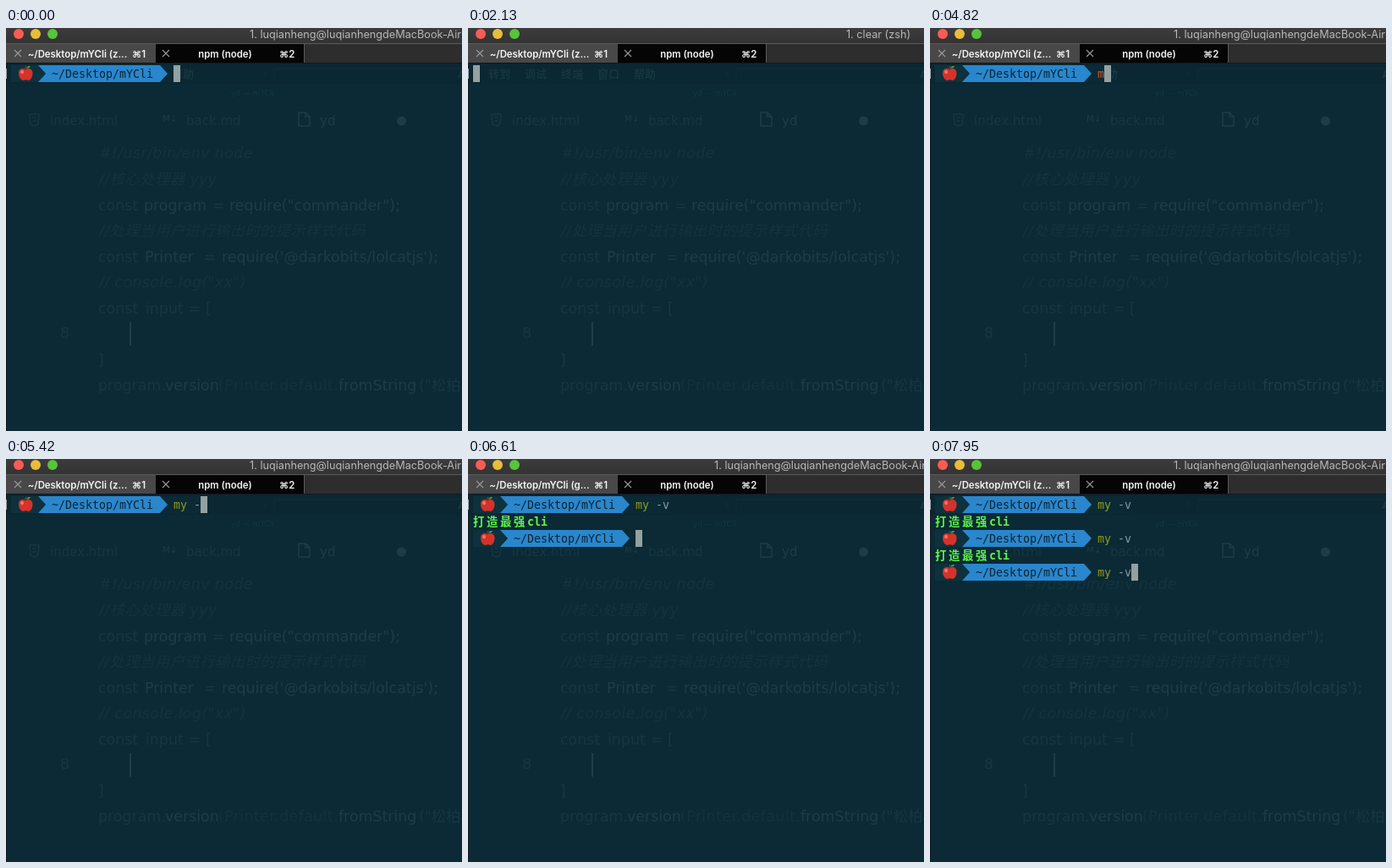
Animation, 539 px wide and 477 px high, one loop 8000 ms. Source, as an HTML page:

```html
<!DOCTYPE html>
<html lang="en">
<head>
<meta charset="utf-8">
<title>Terminal session</title>
<style>
  html, body { margin: 0; width: 100%; height: 100%; overflow: hidden; background: #0b2a35; }
  svg { display: block; width: 100vw; height: 100vh; }
  text { white-space: pre; }
  .ui { font-family: Inter, "DejaVu Sans", sans-serif; }
  .title { font-size: 12.7px; fill: #b8b8b8; }
  .tab { font-size: 11.4px; font-weight: 600; fill: #f4f4f4; }
  .mono { font: 13.29px "DejaVu Sans Mono", monospace; }
  .out { font: bold 13.29px "DejaVu Sans Mono", "Noto Sans CJK SC", "Noto Sans CJK", monospace; fill: #60f54b; }
  .ghost { font: 17.4px "DejaVu Sans", "Noto Sans CJK SC", "Noto Sans CJK", sans-serif; fill: #163640; }
  .faint { fill: #14333d; font-style: italic; letter-spacing: .4px; }
  .dim { fill: #13323c; letter-spacing: .4px; }
  .strong { fill: #1c3d48; }
  .file { font-size: 15px; }
  .menu { font-size: 13px; font-weight: bold; fill: #17363f; }
  .line { fill: none; stroke: #163640; stroke-width: 1.5; }
</style>
</head>
<body>
<svg viewBox="0 0 539 477" preserveAspectRatio="none">
  <defs>
    <linearGradient id="bar" x2="0" y2="1">
      <stop offset="0" stop-color="#3d3c3c"/>
      <stop offset="1" stop-color="#343333"/>
    </linearGradient>
    <g id="prompt">
      <path d="M6 0H38L46 10 38 20H6Z" fill="#0d323e"/>
      <path d="M38 0H182L191 10 182 20H38L47 10Z" fill="#2a86cd"/>
      <path d="M23 5C20 3 15 4 15 9.500C15 14 18 18 20.500 18C22 18 22.500 17.300 23.500 17.300S25 18 26.500 18C29 18 31.500 14 31.500 9.500C31.500 4 26 3 23 5Z" fill="#d6322b"/>
      <ellipse cx="19" cy="8" rx="2" ry="2.300" fill="#f0776a"/>
      <path d="M23 6Q22.500 3 24 1" fill="none" stroke="#6b4426" stroke-width="1.300"/>
      <path d="M24 3.500Q25 .5 29 1Q28 4 24 3.500Z" fill="#62a63a"/>
      <text class="mono" x="54" y="14.500" fill="#0a2530">~/Desktop/mYCli</text>
    </g>
    <path id="close" d="M-4 -4L4 4M4 -4L-4 4" stroke="#999" stroke-width="1.100"/>
  </defs>

  <rect width="539" height="477" fill="#0b2a35"/>
  <rect y="42" width="539" height="24" fill="#0b2731"/>
  <g id="ghost"></g>
  <path d="M.5 41V477" stroke="#12191d"/>
  <path d="M.5 48V60" stroke="#9aa3a6"/>

  <rect width="539" height="18" fill="url(#bar)"/>
  <rect y="18" width="539" height="24" fill="#2d2d2d"/>
  <rect y="19" width="177" height="22" fill="#484848"/>
  <rect x="177" y="19" width="175" height="22" fill="#050505"/>
  <path d="M0 41.500H539" stroke="#171717"/>
  <path d="M0 18.500H539M352.500 18V41" stroke="#5a5a5a"/>
  <circle cx="15" cy="7" r="6" fill="#fb5b55"/>
  <circle cx="35" cy="7" r="6" fill="#e8bd3b"/>
  <circle cx="55" cy="7" r="6" fill="#57c43c"/>
  <use href="#close" x="14" y="30"/>
  <use href="#close" x="189" y="30"/>
  <g class="ui tab">
    <text id="tab" x="84.500" y="34.500" text-anchor="middle"></text>
    <text x="149" y="34.500">⌘1</text>
    <text x="259" y="34.500" text-anchor="middle">npm (node)</text>
    <text x="323" y="34.500">⌘2</text>
  </g>
  <text id="title" class="ui title" y="12"></text>
  <g id="screen"></g>
</svg>
<script>
const $ = id => document.getElementById(id);
const LOOP = 8000, ROW = 20, CELL = 8, LEFT = 6, TOP = 44, PROMPT = 24;

const esc = s => s.replace(/&/g, '&amp;').replace(/</g, '&lt;');
const rect = (x, y, w, fill) => `<rect x="${x}" y="${y}" width="${w}" height="${ROW}" fill="${fill}"/>`;

// Editor window showing faintly through the terminal
const code = (x, y, s, cls = '') => `<text x="${x}" y="${y}" class="ghost ${cls}">${esc(s)}</text>`;
$('ghost').innerHTML = [
  ...['转到', '调试', '终端', '窗口', '帮助'].map((s, i) => code(24 + i * 43, 59, s, 'menu')),
  '<path class="line" d="M304 51l3 3-3 3M317 64V48H539" opacity=".4"/>',
  code(534, 59, 'A', 'menu'),
  '<text class="ghost" x="266" y="80" style="font-size:9px">yd — mYCli</text>',
  '<path class="line" d="M28 102H39L38 114 33.500 116 29 114ZM31 106H36M31 110H36"/>',
  code(52, 115, 'index.html', 'file'),
  '<text class="ghost strong" x="185" y="111" style="font-size:10px">M↓</text>',
  code(213, 115, 'back.md', 'file'),
  '<path class="line" d="M346 100H354L359 105V116H346ZM354 100V105H359" style="stroke:#1c3d48"/>',
  code(371, 115, 'yd', 'file strong'),
  '<circle cx="467.500" cy="110" r="5.500" fill="#1c3d48"/>',
  code(110, 154, '#!/usr/bin/env node', 'faint'),
  code(110, 185, '//核心处理器 yyy', 'faint'),
  code(109, 216, 'const'), code(163, 216, 'program', 'strong'), code(244, 216, '='),
  code(264, 216, 'require("commander");', 'strong'),
  code(110, 246, '//处理当用户进行输出时的提示样式代码', 'faint'),
  code(109, 277, 'const'), code(164, 277, 'Printer', 'strong'), code(234, 277, '='),
  code(255, 277, "require('@darkobits/lolcatjs');", 'strong'),
  code(110, 307, '// console.log("xx")', 'faint'),
  code(109, 338, 'const'), code(165, 338, 'input'), code(216, 338, '='), code(236, 338, '['),
  code(64, 367, '8'),
  '<path class="line" d="M147 348V376" style="stroke:#274650"/>',
  code(109, 399, ']'),
  code(109, 429, 'program.'), code(188, 429, 'version', 'strong'),
  code(251, 429, '(Printer.default.', 'dim'),
  code(393, 429, 'fromString', 'strong'), code(488, 429, '("松柏小筑")')
].join('');

const OUT = '打造最强cli';
const HOST = '1. luqianheng@luqianhengdeMacBook-Air: ~/Desktop/mYCli ';
const home = job => ({ title: HOST + `(${job})`, x: job === 'git' ? 291 : 288 });
const running = s => ({ title: '1. ' + s, x: null });
const cwd = c => ({ tab: `~/Desktop/mYCli (${c}...` });
const rows = (...list) => ({ rows: list });
const run = '$my -v';

// Each step changes only what it names; "$" marks a prompt row
const steps = [
  [0, home('zsh'), cwd('z'), rows('$')],
  [500, rows('$clear')],
  [940, running('clear (zsh)')],
  [1090, home('zsh'), rows('$')],
  [1840, rows('$clear')],
  [2130, running('clear (zsh)'), rows('')],
  [2280, home('zsh'), cwd('g'), rows('$')],
  [2430, home('git')],
  [3030, home('zsh'), cwd('z')],
  [4820, rows('$m')],
  [4970, rows('$my')],
  [5270, rows('$my ')],
  [5420, rows('$my -')],
  [5720, rows(run)],
  [6160, running('my -v (zsh)'), { tab: 'my (zsh)' }, rows(run, '')],
  [6460, home('zsh'), cwd('z'), rows(run, OUT, '$')],
  [6610, home('git'), cwd('g')],
  [7060, rows(run, OUT, run)],
  [7210, running('my -v (git)'), { tab: 'my (git)' }],
  [7360, running('my -v (zsh)'), { tab: 'my (zsh)' }, rows(run, OUT, run, '')],
  [7500, home('zsh'), cwd('z')],
  [7650, rows(run, OUT, run, OUT, '$')],
  [7950, rows(run, OUT, run, OUT, run)]
];
let last = {};
const states = steps.map(([at, ...changes]) => last = Object.assign({}, last, ...changes, { at }));

function command(s, y) {
  const [name] = s.split(' ');
  const x = LEFT + PROMPT * CELL;
  const known = name === 'my' || name === 'clear';
  return `<text class="mono" x="${x}" y="${y}" fill="#8a9aa0"><tspan fill="${known ? '#919c1c' : '#d4542a'}">${name}</tspan>${s.slice(name.length)}</text>`;
}

function output(s, y) {
  let x = LEFT;
  const xs = [...s].map(c => {
    const at = x;
    x += c > '\u2e80' ? 2 * CELL : CELL;
    return at;
  });
  return rect(LEFT, y, x - LEFT, '#0b2a35') +
    `<text class="out" x="${xs.join(' ')}" y="${y + 14.5}">${s}</text>`;
}

function row(s, i) {
  const y = TOP + i * ROW;
  if (!s) return '';
  if (s[0] !== '$') return output(s, y);
  const cmd = s.slice(1);
  return rect(LEFT, y, (PROMPT + cmd.length) * CELL, '#0b2a35') +
    `<use href="#prompt" y="${y}"/>` + command(cmd, y + 14.5);
}

function cursor(list) {
  const end = list[list.length - 1];
  const col = end[0] === '$' ? PROMPT + end.length - 1 : 0;
  return rect(LEFT + col * CELL, TOP + (list.length - 1) * ROW, CELL, '#93a1a1');
}

let shown;
function draw(t) {
  const s = states.filter(s => s.at <= t).pop();
  if (s === shown) return;
  shown = s;
  const title = $('title');
  title.textContent = s.title;
  title.setAttribute('x', s.x || 485);
  title.setAttribute('text-anchor', s.x ? 'start' : 'middle');
  $('tab').textContent = s.tab;
  $('screen').innerHTML = s.rows.map(row).join('') + cursor(s.rows);
}

const start = performance.now();
function tick() {
  draw((performance.now() - start) % LOOP);
  requestAnimationFrame(tick);
}
tick();
</script>
</body>
</html>
```
